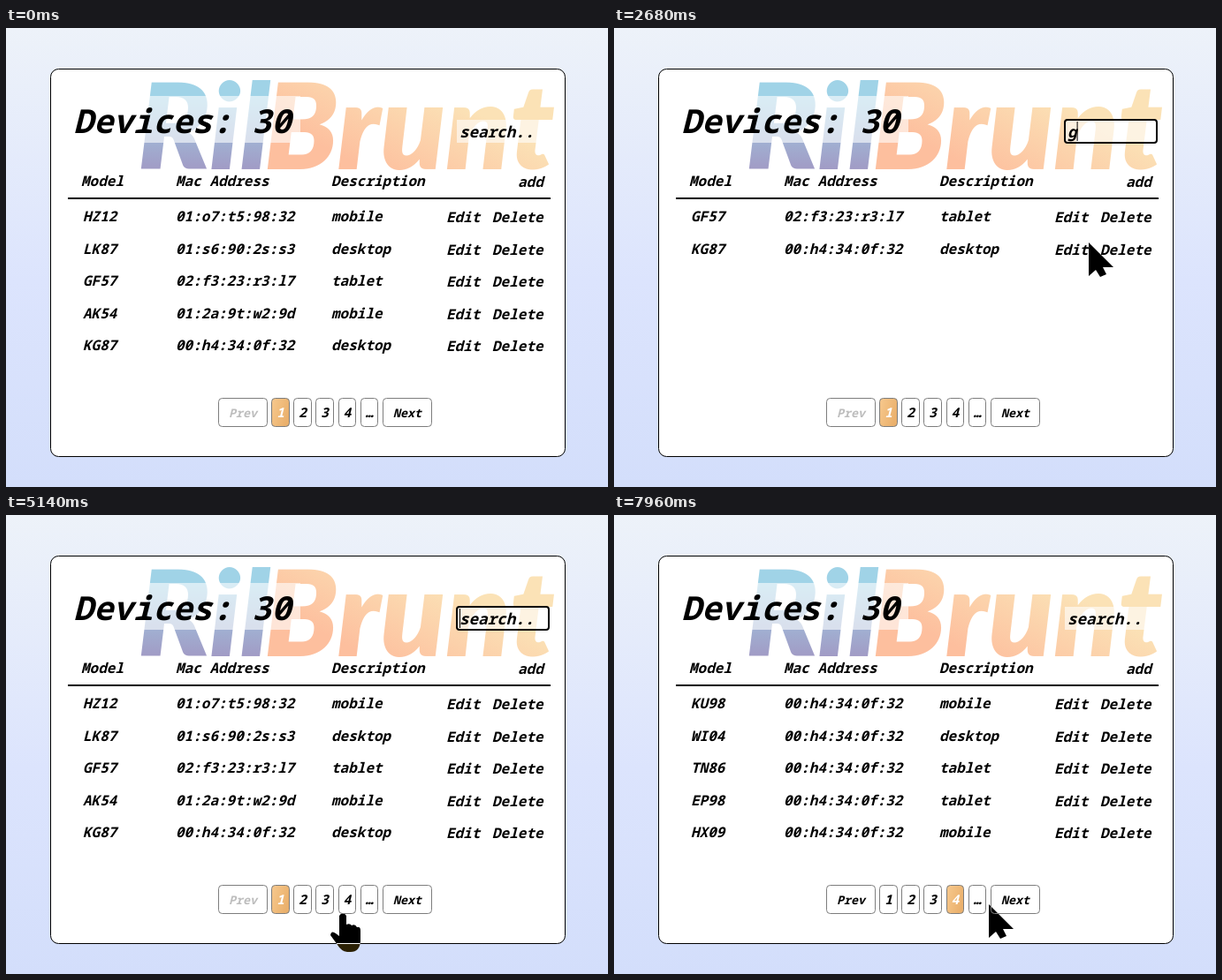
These frames come from a looping animation (681x520 px, 8000 ms). An HTML page:

```html
<!DOCTYPE html>
<html lang="en">
<head>
<meta charset="utf-8">
<title>Devices</title>
<style>
  html, body { margin: 0; width: 100%; height: 100%; overflow: hidden; }
  svg { display: block; width: 681px; height: 520px; isolation: isolate; }
  text { font: italic 700 16px "Noto Sans Mono", "DejaVu Sans Mono", monospace; white-space: pre; }
  .brand { font: italic 900 134px Lato, "Open Sans", sans-serif; }
  .title { font-size: 37.3px; }
  .query { font-size: 17.6px; }
  .nav { font-size: 13.33px; text-anchor: middle; }
  .num { font-size: 15px; }
  .veil { fill: #fff; opacity: .6; }
  #cursor { mix-blend-mode: difference; fill: #fff; }
</style>
</head>
<body>
<svg id="stage" viewBox="0 0 681 520" xmlns="http://www.w3.org/2000/svg">
  <defs>
    <linearGradient id="sky" x2="0" y2="1">
      <stop stop-color="#edf2f9"/>
      <stop offset=".55" stop-color="#dce4fd"/>
      <stop offset="1" stop-color="#d3defb"/>
    </linearGradient>
    <linearGradient id="cool" gradientUnits="userSpaceOnUse" x1="0" y1="62" x2="0" y2="160">
      <stop offset=".15" stop-color="#a0d3e7"/>
      <stop offset="1" stop-color="#a19bc5"/>
    </linearGradient>
    <linearGradient id="warm" gradientUnits="userSpaceOnUse" x1="420" y1="165" x2="470" y2="65">
      <stop stop-color="#fdbf9e"/>
      <stop offset="1" stop-color="#fbe2b6"/>
    </linearGradient>
    <linearGradient id="active" x2="1" y2="0.5">
      <stop stop-color="#f6c88e"/>
      <stop offset=".5" stop-color="#f1bd7d"/>
      <stop offset="1" stop-color="#eab06c"/>
    </linearGradient>
  </defs>
  <rect width="681" height="520" fill="url(#sky)"/>
  <rect x="50.5" y="46.5" width="582" height="439" rx="9" fill="#fff" stroke="#000"/>
  <text class="brand" x="149" y="160" fill="url(#cool)">Ril</text>
  <text class="brand" x="292" y="160" fill="url(#warm)">Brunt</text>
  <rect class="veil" x="78" y="77" width="255" height="53"/>
  <rect class="veil" x="510" y="104" width="104" height="26"/>
  <text class="title" x="76.5" y="119">Devices: 30</text>
  <text x="85" y="179">Model</text>
  <text x="192" y="179">Mac Address</text>
  <text x="368" y="179">Description</text>
  <text x="579" y="180">add</text>
  <rect x="70" y="192" width="546" height="2"/>
  <g id="rows"></g>
  <g id="pager"></g>
  <rect id="ring" x="510" y="104" width="104" height="26" rx="3" fill="none" stroke="#000" stroke-width="2"/>
  <text id="query" class="query" x="513" y="124"></text>
  <rect id="caret" y="106" width="1" height="22"/>
  <g id="cursor">
    <path id="arrow" d="M0 0V38L8 31L13 39L20 36L16 28H28Z"/>
    <path id="beam" d="M-11-18H-2L0-16L2-18H11V-12H3V12H10V18H2L0 16L-2 18H-10V12H-3V-12H-11Z"/>
    <path id="hand" transform="translate(-14)" d="M10 3Q14-3 18 3V13Q22 11 24 14Q28 12 30 16Q34 15 34 20V32Q33 44 23 44H19Q12 43 8 36L0 25Q1 19 6 23L10 26Z"/>
  </g>
</svg>
<script>
const LOOP = 8000;
const SVG = "http://www.w3.org/2000/svg";
const byId = id => document.getElementById(id);

function add(parent, tag, attrs, text = "") {
  const el = document.createElementNS(SVG, tag);
  for (const key in attrs) el.setAttribute(key, attrs[key]);
  el.textContent = text;
  parent.append(el);
  return el;
}

const show = (el, on) => el.setAttribute("visibility", on ? "visible" : "hidden");
const parse = list => list.split(",").map(row => row.split(" "));

const pages = [
  "HZ12 01:o7:t5:98:32 mobile,LK87 01:s6:90:2s:s3 desktop,GF57 02:f3:23:r3:l7 tablet,AK54 01:2a:9t:w2:9d mobile,KG87 00:h4:34:0f:32 desktop",
  "BT45 01:2a:9t:w2:9d tablet,MU31 00:h4:34:0f:32 mobile,RD68 01:s6:90:2s:s3 desktop,PL20 02:f3:23:r3:l7 mobile,SN77 00:h4:34:0f:32 tablet",
  "HZ12 01:o7:t5:98:32 mobile,LK87 01:s6:90:2s:s3 desktop,GF57 02:f3:23:r3:l7 tablet,AO54 01:2a:9t:w2:9d mobile,HG87 00:h4:34:0f:32 desktop",
  "KU98 00:h4:34:0f:32 mobile,WI04 00:h4:34:0f:32 desktop,TN86 00:h4:34:0f:32 tablet,EP98 00:h4:34:0f:32 tablet,HX09 00:h4:34:0f:32 mobile"
].map(parse);

// Step tracks: [time, value]
const queryTrack = [[0, ""], [2300, "g"], [2780, "gf"], [3960, "g"], [4660, ""]];
const activeTrack = [[0, 1], [6040, 2], [6670, 3], [7670, 4]];
const rowsTrack = [[0, 0], [6090, 1], [6720, 2], [7720, 3]];
const FOCUS = 1370, BLUR = 5880;

// Pointer keys: [time, x, y, shape from here on]
const path = [
  [480, 640, 522, "arrow"], [800, 612, 300, "arrow"], [1120, 564, 112, "beam"],
  [1260, 557, 102, "beam"], [1500, 561, 121, "beam"], [1770, 565, 128, "beam"],
  [1870, 564, 130, "beam"], [2010, 564, 130, "arrow"], [2160, 562, 135, "arrow"],
  [2300, 562, 135, "arrow"], [2750, 532, 262, "arrow"], [3060, 521, 312, "arrow"],
  [3450, 521, 315, "arrow"], [3870, 527, 330, "arrow"], [3960, 527, 330, "arrow"],
  [4240, 527, 325, "arrow"], [4610, 527, 324, "arrow"], [4880, 450, 400, "arrow"],
  [5080, 388, 449, "hand"], [5140, 381, 451, "hand"], [5390, 361, 437, "hand"],
  [5800, 345, 436, "hand"], [6040, 345, 438, "hand"], [6200, 345, 438, "hand"],
  [6530, 363, 438, "hand"], [6720, 363, 438, "hand"], [7240, 400, 438, "hand"],
  [7430, 405, 425, "hand"], [7480, 405, 436, "hand"], [7670, 405, 436, "hand"],
  [7900, 422, 441, "arrow"], [7960, 424, 441, "arrow"]
];

const at = (track, t) => track.filter(key => key[0] <= t).pop();

const rows = Array.from({ length: 5 }, (_, i) => {
  const y = Math.round(219 + i * 36.5);
  const group = add(byId("rows"), "g", {});
  const cells = [87, 192, 368].map(x => add(group, "text", { x, y }));
  add(group, "text", { x: 498, y: y + 1 }, "Edit");
  add(group, "text", { x: 550, y: y + 1 }, "Delete");
  return { group, cells };
});

// Page buttons sit on whole pixels, so their widths differ slightly.
function buttonSpan(i) {
  if (i === 0) return [240.5, 295.5];
  if (i === 6) return [426.5, 481.5];
  return [300.5 + Math.round((i - 1) * 25.2), 320.5 + (i - 1) * 25];
}

const buttons = ["Prev", "1", "2", "3", "4", "…", "Next"].map((label, i) => {
  const wide = label.length > 1;
  const [x, right] = buttonSpan(i);
  const box = add(byId("pager"), "rect",
    { x, y: 419.5, width: right - x, height: 32, rx: 4, stroke: "#7d7d7d" });
  const text = add(byId("pager"), "text",
    { x: (x + right) / 2, y: 441, class: wide ? "nav" : "nav num" }, label);
  return { box, text };
});

function drawRows(page, query) {
  const found = pages[page].filter(row => row[0].toLowerCase().includes(query));
  rows.forEach(({ group, cells }, i) => {
    show(group, i < found.length);
    if (found[i]) cells.forEach((cell, c) => cell.textContent = found[i][c]);
  });
}

function drawPager(active) {
  buttons.forEach(({ box, text }, i) => {
    box.setAttribute("fill", i === active ? "url(#active)" : "#fff");
    text.setAttribute("fill", i === active ? "#fff" : i === 0 && active === 1 ? "#bdbdbd" : "#000");
  });
}

function drawSearch(t, [typedAt, query]) {
  const focused = t >= FOCUS && t < BLUR;
  const blinkOn = (t - Math.max(FOCUS, typedAt)) % 1000 < 500;
  show(byId("ring"), focused);
  show(byId("caret"), focused && blinkOn);
  byId("caret").setAttribute("x", 513 + query.length * 10.6);
  byId("query").textContent = query || "search..";
}

function drawCursor(t) {
  const from = at(path, t);
  const to = path.find(key => key[0] > t) || from;
  const k = from && to !== from ? (t - from[0]) / (to[0] - from[0]) : 0;
  for (const shape of ["arrow", "beam", "hand"]) show(byId(shape), !!from && t >= 500 && from[3] === shape);
  if (!from) return;
  const x = Math.round(from[1] + (to[1] - from[1]) * k);
  const y = Math.round(from[2] + (to[2] - from[2]) * k);
  byId("cursor").setAttribute("transform", `translate(${x} ${y})`);
}

function draw(t) {
  const typed = at(queryTrack, t);
  drawRows(at(rowsTrack, t)[1], typed[1]);
  drawPager(at(activeTrack, t)[1]);
  drawSearch(t, typed);
  drawCursor(t);
}

const start = performance.now();
function tick() {
  draw((performance.now() - start) % LOOP);
  requestAnimationFrame(tick);
}
tick();
</script>
</body>
</html>
```
